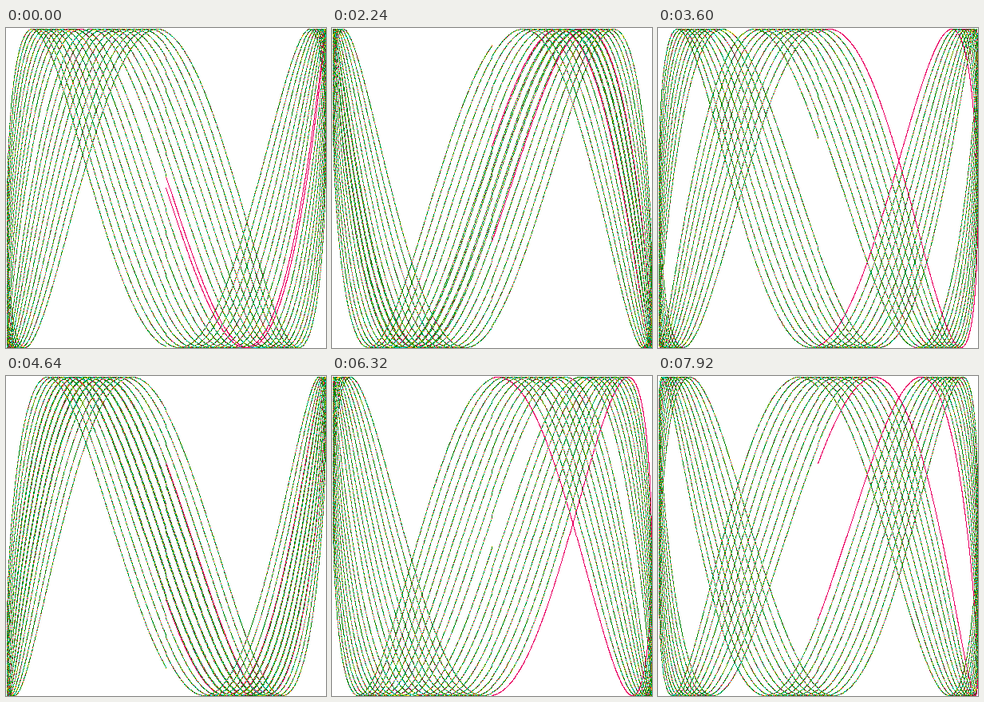
These frames come from a looping animation (401 by 401 pixels, 8 s). An HTML page with a canvas:

```html
<!DOCTYPE html>
<html lang="en">
<head>
<meta charset="utf-8">
<title>Lissajous</title>
<style>
  html, body { margin: 0; width: 100%; height: 100%; overflow: hidden; background: #fff; }
  canvas { display: block; width: 401px; height: 401px; }
</style>
</head>
<body>
<canvas id="stage" width="401" height="401"></canvas>
<script>
const R = 200, SIZE = 2 * R + 1;
const FREQ = 3.02328, CYCLES = 10, STEP = 0.001;
const FRAME_MS = 80, FRAMES = 100, PHASE_STEP = 0.1;

const rgb = (r, g, b) => (255 << 24 | b << 16 | g << 8 | r) >>> 0;
const WHITE = rgb(255, 255, 255);
const PINK = rgb(233, 0, 99);
const GREEN = rgb(0, 128, 0);
const CYAN = rgb(0, 221, 221);
const YELLOW = rgb(238, 204, 0);
const DASHES = [GREEN, CYAN, GREEN, PINK, GREEN, YELLOW];

const ctx = document.getElementById('stage').getContext('2d');
const image = ctx.createImageData(SIZE, SIZE);
const pixels = new Uint32Array(image.data.buffer);

// Rounds toward zero, so the curve spans pixels 1 to 400.
const toPixel = v => R + Math.trunc(v * R + 0.5);

function draw(phase) {
  pixels.fill(WHITE);
  const count = Math.ceil(CYCLES * 2 * Math.PI / STEP);
  for (let i = 0; i < count; i++) {
    const t = i * STEP;
    const x = toPixel(Math.sin(t));
    const y = toPixel(Math.sin(t * FREQ + phase));
    pixels[y * SIZE + x] = t < Math.PI ? PINK : DASHES[i % DASHES.length];
  }
  ctx.putImageData(image, 0, 0);
}

const start = performance.now();
let shown = -1;

function tick() {
  const elapsed = Math.max(0, performance.now() - start);
  const frame = Math.floor(elapsed / FRAME_MS) % FRAMES;
  if (frame !== shown) {
    shown = frame;
    draw(frame * PHASE_STEP);
  }
  requestAnimationFrame(tick);
}
tick();
</script>
</body>
</html>
```
